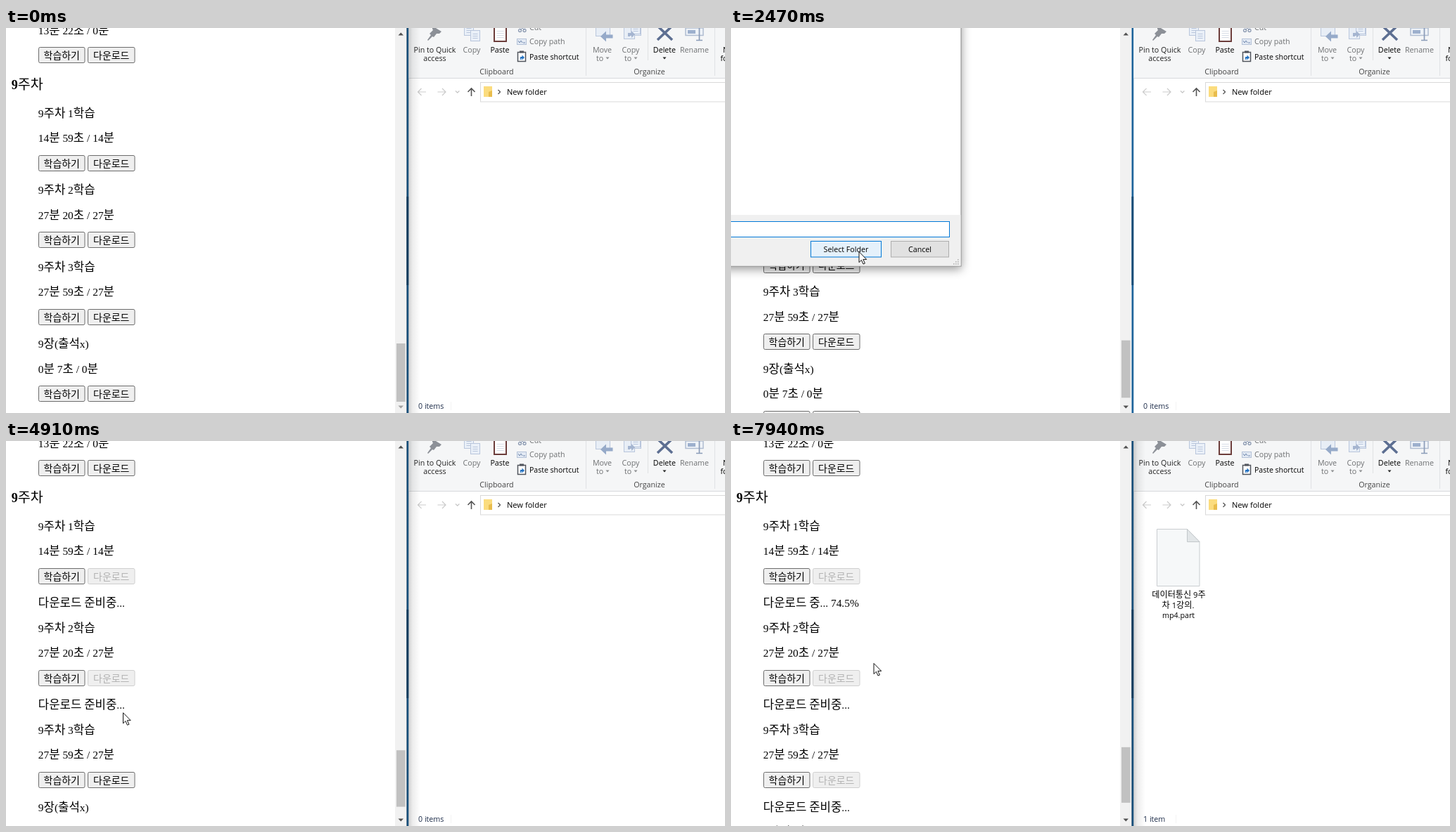
Write an HTML page that moves like this. It is 1022 px wide and 548 px high and loops after 8 s.

```html
<!DOCTYPE html>
<html lang="ko">
<head>
<meta charset="utf-8">
<title>Download demo</title>
<style>
  html, body { margin: 0; width: 100%; height: 100%; overflow: hidden; background: #fff; }
  svg { display: block; width: 1022px; height: 548px; }
  text { white-space: pre; }
  .page { font: 15.4px "Liberation Serif", "Noto Sans CJK KR", "Noto Sans CJK", serif; }
  .ui { font: 10.7px "Open Sans", "Noto Sans CJK KR", "Noto Sans CJK", sans-serif; }
  .ko { font-size: 1.087em; }
  .page .ko { font-weight: 350; }
  .page [font-weight] .ko { font-weight: 500; }
  #dialog { filter: drop-shadow(0 4px 7px rgba(0, 0, 0, .4)); }
</style>
</head>
<body>
<svg viewBox="0 0 1022 548">
  <linearGradient id="fade">
    <stop offset="0" stop-opacity=".24"/>
    <stop offset=".45" stop-opacity=".07"/>
    <stop offset="1" stop-opacity="0"/>
  </linearGradient>
  <rect width="1022" height="548" fill="#fff"/>
  <g id="page" class="page"></g>
  <g id="explorer" class="ui"></g>
  <g id="file" class="ui"></g>
  <rect id="shadow" x="569" width="20" height="548" fill="url(#fade)"/>
  <g id="dialog" class="ui"></g>
  <g id="pointer">
    <circle id="press" cx=".5" cy="1" r="12" fill="#ffee20" opacity=".62"/>
    <path d="M.5.5V15.6L3.9 12.3L6.5 18L8.9 17L6.3 11.4H11.2Z" fill="#fff" stroke="#111"/>
  </g>
</svg>
<script>
const LOOP = 8000;
const $ = id => document.getElementById(id);

// Timeline, in ms
const CURSOR = [
  [270, 807, 525], [1070, 147, 184], [1120, 147, 184], [1170, 152.5, 189],
  [1900, 152.5, 189], [2380, 181.5, 318], [3020, 181.5, 318], [3240, 168, 331],
  [3850, 168, 331], [4200, 181, 318], [4720, 181, 318], [5150, 145, 482],
  [5650, 145, 482], [6050, 171, 317], [7710, 171, 317], [7940, 202.5, 316]
];
const PRESSES = [[1490, 1620], [2520, 2620], [3420, 3630], [4300, 4420], [5260, 5400], [6420, 6540]];
const DIALOGS = [[1700, 2640], [3680, 4440], [5460, 6620]];
const QUEUED = [1640, 3640, 5420];
const FILE_TIME = 6000;
const PROGRESS = [[6160, '18.6'], [6720, '37.3'], [7300, '55.9'], [7860, '74.5']];

const clamp = v => Math.min(1, Math.max(0, v));
const smooth = p => p * p * (3 - 2 * p);
const during = (t, [from, to]) => t >= from && t < to;
const inside = ([x, y], l, top, w, h) => x >= l && x <= l + w && y >= top && y <= top + h;

// Markup helpers
const hangul = s => s.replace(/[가-힣]+/g, '<tspan class="ko">$&</tspan>');
const text = (x, y, s, attrs = '') => `<text x="${x}" y="${y}" ${attrs}>${hangul(s)}</text>`;
const rect = (x, y, w, h, fill, stroke = 'none', attrs = '') =>
  `<rect x="${x}" y="${y}" width="${w}" height="${h}" fill="${fill}" stroke="${stroke}" ${attrs}/>`;
const path = (d, fill, stroke = 'none', width = 1) =>
  `<path d="${d}" fill="${fill}" stroke="${stroke}" stroke-width="${width}"/>`;
const label = (x, y, s, color = '#6f7173', size = 10.7) =>
  text(x, y, s, `text-anchor="middle" fill="${color}" font-size="${size}"`);

function button(x, y, w, s, state) {
  const [fill, stroke, color] = {
    normal: ['#efefef', '#6c6c6c', '#000'],
    hover: ['#f7f7f7', '#858585', '#222'],
    disabled: ['#efefef', '#cfcfcf', '#b2b2b2']
  }[state];
  return rect(x + .5, y + .5, w, 22, fill, stroke, 'rx="2"') +
    label(x + .5 + w / 2, y + 17, s, color, 12.85);
}

function pageMarkup(queued, percent, cursor) {
  const buttons = (y, disabled) => button(46, y, 65.5, '학습하기', 'normal') +
    button(116, y, 66.5, '다운로드', disabled ? 'disabled' :
      cursor && inside(cursor, 116, y, 67, 23) ? 'hover' : 'normal');
  const lessons = [
    ['9주차 1학습', '14분 59초 / 14분'], ['9주차 2학습', '27분 20초 / 27분'],
    ['9주차 3학습', '27분 59초 / 27분'], ['9장(출석x)', '0분 7초 / 0분']
  ];
  let y = 126.5;
  let out = text(45.8, 8.7, '13분 22초 / 0분') + buttons(27, false) +
    text(7.7, 87, '9주차', 'font-size="18" font-weight="bold"');
  lessons.forEach(([title, time], i) => {
    out += text(45.8, y, title) + text(45.8, y + 35.5, time) +
      buttons(Math.floor(y + 54.6), i < queued);
    y += 109.6;
    if (i < queued) {
      out += text(45.8, y, i || !percent ? '다운로드 준비중...' : `다운로드 중... ${percent}%`);
      y += 35.6;
    }
  });
  return out + scrollbar(queued);
}

function scrollbar(queued) {
  return rect(553, 0, 16, 548, '#f1f1f1') +
    rect(555, 449 - queued * 4.4, 12.5, 83 - queued * 1.3, '#c1c1c1') +
    path('M557.5 10.5h7.5l-3.75-4z', '#505050') +
    path('M557.5 537.5h7.5l-3.75 4z', queued ? '#505050' : '#a0a0a0');
}

function explorerMarkup() {
  const pale = '#b9c6dc', dark = '#222';
  const sheet = (x, y) => rect(x, y, 13, 15, '#eaf0f8', pale) +
    path(`M${x + 3} ${y + 5}h7m-7 3h7m-7 3h7`, 'none', pale);
  const down = (x, color) => path(`M${x - 2.5} 41.5h5l-2.5 3z`, color);
  return rect(569.5, 0, 3, 548, '#1d6399') + rect(569.5, 240, 3, 126, '#174a74') +
    rect(572.5, 0, 450, 548, '#fff') + rect(572.5, 0, 450, 71, '#f5f6f7') +
    rect(572.5, 71, 450, 1, '#d8dadc') +
    path('M824.5 0V68M912.5 0V46M1007.5 0V68', 'none', '#e0e2e4') +
    // clipboard group
    path('M606-3L619 5L616 8L612 8L608 13L606 12L600 18L599 17L604 10L602 8L607 3L606 1Z', '#8c9097') +
    sheet(651.5, -4.5) + sheet(660.5, 3.5) +
    rect(694, -6, 17, 25, '#fff', '#6c3d3b', 'stroke-width="2"') +
    path('M697.5 4.5h10m-10 3h10m-10 3h10m-10 3h10', 'none', '#d5dbe5') +
    path('M731-3L737 3M737-3L731 3', 'none', '#8d9bb2') +
    `<g fill="none" stroke="#8d9bb2" stroke-width="1.3"><circle cx="730.5" cy="3.5" r="2"/><circle cx="737" cy="3.5" r="2"/></g>` +
    rect(726.5, 15.5, 13, 8, '#e3eaf4', '#b3c1d7') +
    path('M728 18l2 3l2-3l2 3M735 21h3', 'none', '#7088ae') +
    rect(727.5, 34.5, 11, 13, '#fff', '#50545c', 'stroke-width="1.5"') +
    rect(730, 32.5, 6, 3, '#50545c') +
    path('M731 45V41h2.5V38.5L737 42L733.5 45.5V43H732.5V45Z', '#1f6fc0') +
    label(609.5, 34.7, 'Pin to Quick', dark) + label(609.5, 46.7, 'access', dark) +
    label(662, 34.7, 'Copy') + label(702, 34.7, 'Paste', '#000') +
    text(744, 2.7, 'Cut', 'fill="#6f7173"') + text(744, 23.2, 'Copy path', 'fill="#6f7173"') +
    text(744, 44.5, 'Paste shortcut', 'font-size="10.5"') + label(697.5, 66.3, 'Clipboard', '#444') +
    // organize group
    rect(838.5, -4.5, 20, 16, '#e8eef6', pale) +
    path('M845 12L853 4.5V9.5H862.5V14.5H853V19.5Z', '#96aac9') +
    sheet(889.5, -4.5) + rect(878.5, -4.5, 15, 20, '#e8eef6', pale) + sheet(888.5, -6.5) +
    path('M884 12V7h5V4l5 5l-5 5v-3h-2v1z', '#a5b5d0') +
    path('M926-3L947 17M947-3L926 17', 'none', '#5d6f92', 3.6) +
    rect(966, 0, 25, 10.5, '#eff3f8', '#b0bdd1', 'stroke-width="1.5"') +
    rect(969, 3, 11, 5, '#9db0cd') + path('M985.5-3V17M981 17.5h9', 'none', '#8c9db9', 1.7) +
    label(847.5, 34.7, 'Move') + label(844, 46.7, 'to') + down(855, '#8d8f91') +
    label(888, 34.7, 'Copy') + label(884, 46.7, 'to') + down(895, '#8d8f91') +
    label(936, 34.7, 'Delete', '#000') + down(936, '#222') + label(978.5, 34.7, 'Rename') +
    label(914.5, 66.3, 'Organize', '#444') +
    text(1019, 34.7, 'New') + text(1015.5, 46.7, 'folder') +
    // address row
    path('M597 91H585.5M590.5 86L585.5 91L590.5 96M613.5 91H625M620 86L625 91L620 96', 'none', '#cbcbcb', 1.2) +
    path('M639 89.5l2.7 2.7l2.7-2.7', 'none', '#c4c4c4', 1.2) +
    path('M661.5 97V86M656.5 91L661.5 86L666.5 91', 'none', '#555', 1.6) +
    rect(674.5, 77.5, 360, 27.5, '#fff', '#d9d9d9') +
    rect(679, 83, 12, 15, '#fbdc7e') + path('M686 98V91l5-2v9z', '#e9bd4d') +
    path('M699.5 88l3 3l-3 3', 'none', '#555', 1.3) +
    text(712, 94.8, 'New folder', 'font-size="11.1"') +
    path('M632.5 532V544', 'none', '#f3f3f3');
}

const fileMarkup = shown => text(586, 542, shown ? '1 item' : '0 items', 'fill="#1e2d4a"') + (!shown ? '' :
  path('M605.5 125.5H648.5L666 143.5V206.5H605.5Z', '#f6f8f9', '#c9cdd0') +
  path('M648.5 125.5V143.5H666Z', '#e2e6e8', '#c3c8cb') +
  label(636.5, 223, '데이터통신 9주', '#000', 11.2) +
  label(635.5, 237.5, '차 1강의.', '#000', 11.2) +
  label(636, 252, 'mp4.part', '#000'));

function dialogMarkup(cursor, chosen) {
  const over = cursor && inside(cursor, 113, 303, 101, 23);
  const grip = [[323, 330], [320, 333], [323, 333], [317, 336], [320, 336], [323, 336]];
  return rect(-600.5, -300.5, 927.5, 639.5, '#fff', '#8a8a8a') +
    rect(-600, 266, 926.5, 72.5, '#f0f0f0') +
    rect(-400.5, 275.5, 711, 22, '#fff', '#0078d7') +
    rect(113.5, 303.5, 100, 22.5, chosen ? '#cce4f7' : over ? '#e5f1fb' : '#e1e1e1', '#0078d7') +
    rect(227.5, 303.5, 82, 22.5, '#e1e1e1', '#adadad') +
    label(163.5, 318.7, 'Select Folder', '#000') + label(268.5, 318.7, 'Cancel', '#000') +
    grip.map(([x, y]) => rect(x - 1, y - 1, 1.6, 1.6, '#b5b5b5')).join('');
}

function cursorAt(t) {
  if (t < CURSOR[0][0]) return null;
  const next = CURSOR.findIndex(k => k[0] > t);
  if (next < 0) return CURSOR.at(-1).slice(1);
  const [t0, x0, y0] = CURSOR[next - 1], [t1, x1, y1] = CURSOR[next];
  const p = smooth((t - t0) / (t1 - t0));
  return [x0 + (x1 - x0) * p, y0 + (y1 - y0) * p];
}

const drawn = {};
function put(id, markup) {
  if (drawn[id] !== markup) $(id).innerHTML = drawn[id] = markup;
}
const show = (id, visible) => $(id).style.display = visible ? '' : 'none';

function render(t) {
  const cursor = cursorAt(t);
  const dialog = DIALOGS.find(([open, close]) => during(t, [open, close + 200]));
  const queued = QUEUED.filter(q => t >= q).length;
  const percent = PROGRESS.filter(([at]) => t >= at).at(-1)?.[1];

  put('page', pageMarkup(queued, percent, dialog ? null : cursor));
  put('file', fileMarkup(t >= FILE_TIME));

  // The page window casts its shadow only while it has the focus
  show('shadow', !DIALOGS.some(d => during(t, d)));
  show('dialog', dialog);
  if (dialog) {
    const [open, close] = dialog;
    const leave = clamp((t - close) / 200);
    const shown = Math.min(clamp((t - open) / 180), 1 - leave);
    const chosen = PRESSES.some(([down]) => down > open + 300 && down < close && t >= down);
    put('dialog', dialogMarkup(cursor, chosen));
    $('dialog').setAttribute('opacity', shown);
    $('dialog').setAttribute('transform',
      `translate(-110 100) scale(${.95 + .05 * shown}) translate(110 -100)`);
  }

  show('pointer', cursor);
  if (cursor) $('pointer').setAttribute('transform', `translate(${cursor})`);
  show('press', PRESSES.some(p => during(t, p)));
}

put('explorer', explorerMarkup());
const start = performance.now();
(function tick() {
  render((performance.now() - start) % LOOP);
  requestAnimationFrame(tick);
})();
</script>
</body>
</html>
```
